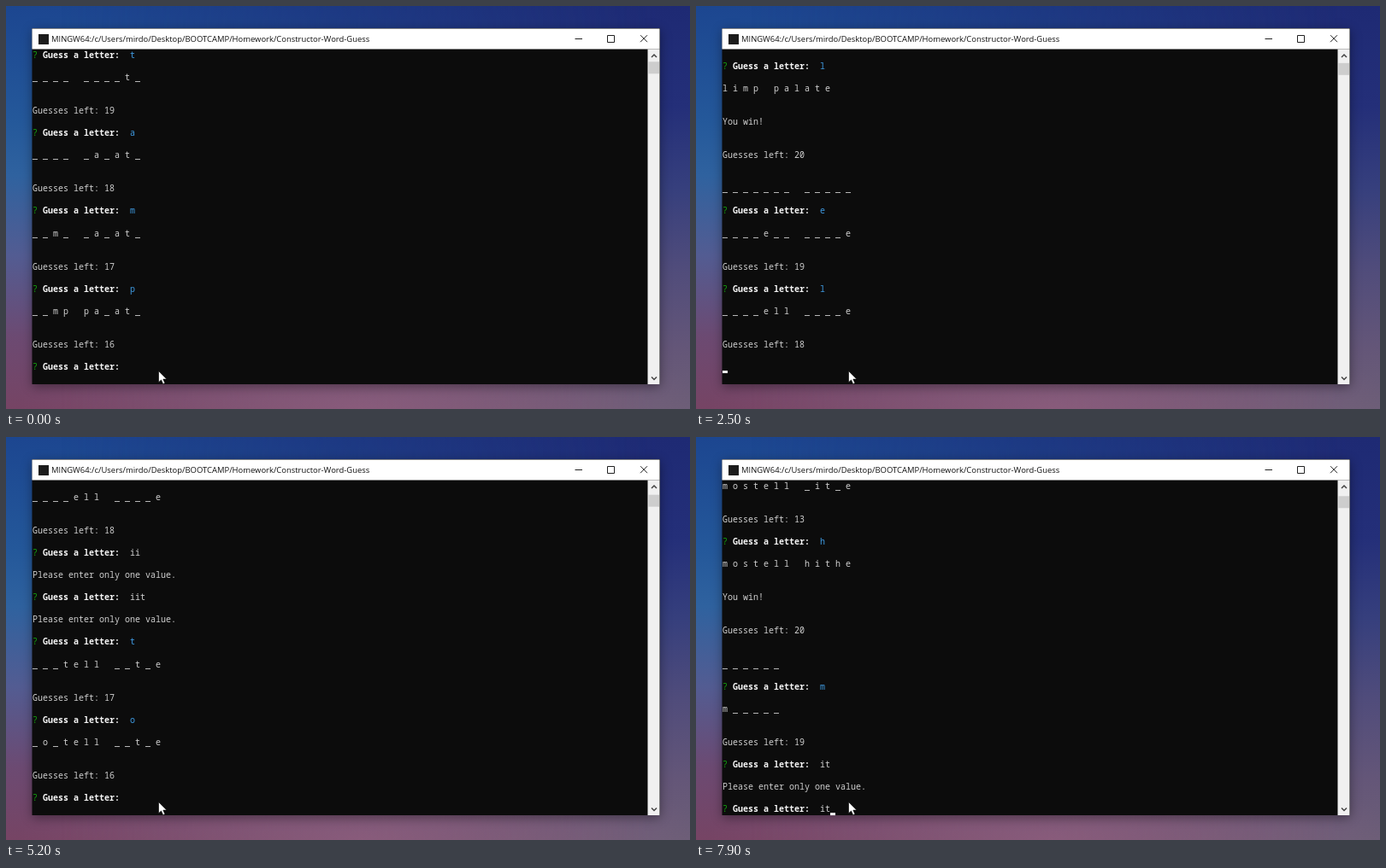
These frames come from a looping animation (800 px wide and 472 px high, 8000 ms). An HTML page:

```html
<!DOCTYPE html>
<html lang="en">
<head>
<meta charset="utf-8">
<title>Word guess terminal</title>
<style>
  html, body { margin: 0; width: 100%; height: 100%; overflow: hidden; }
  .stage {
    position: relative; width: 800px; height: 472px; overflow: hidden;
    background: linear-gradient(#1c4690, #24589a 28%, #2f629f 42%, #535c92 62%, #6c4a72 82%, #764464);
  }
  .stage > * { position: absolute; }
  .dusk {
    inset: 0;
    background: linear-gradient(#1e2a74, #242f79 25%, #363f7d 45%, #504c7b 65%, #645678 85%, #6c5e77);
    -webkit-mask-image: linear-gradient(90deg, transparent 8%, #000 95%);
    mask-image: linear-gradient(90deg, transparent 8%, #000 95%);
  }
  .glow {
    inset: 0;
    background: radial-gradient(ellipse 400px 110px at 52% 100%, rgba(156,100,134,.55), transparent);
  }
  .shadow {
    left: 31px; top: 26px; width: 734px; height: 417px;
    box-shadow: 0 3px 12px rgba(0,0,0,.4);
  }
  .title {
    left: 53px; top: 26px; line-height: 25px; white-space: pre; color: #111;
    font-family: "Open Sans", "Noto Sans", sans-serif; font-size: 9.43px;
  }
  .text {
    left: 31px; top: 50.5px; width: 719px; height: 392.5px; margin: 0; overflow: hidden;
    font-family: "Noto Sans Mono", "DejaVu Sans Mono", monospace;
    font-size: 10px; font-weight: 500; line-height: 13.07px; color: #d0d0d0;
    font-variant-ligatures: none;
  }
  .text i { font-style: normal; color: #13a10e; }
  .text b { font-weight: 600; color: #f5f5f5; }
  .text u { text-decoration: none; color: #3f9be2; }
  .cursor { left: 31px; top: 50.5px; width: 6px; height: 3px; background: #f2f2f2; }
  svg { left: 0; top: 0; }
</style>
</head>
<body>
<div class="stage">
  <div class="dusk"></div>
  <div class="glow"></div>
  <div class="shadow"></div>
  <svg width="800" height="472" fill="none">
    <path d="M30.500 26h734.500v417h-734.500z" fill="#0c0c0c"/>
    <path d="M30.500 26.500h734v24h-734z" fill="#fff"/>
    <path d="M750.500 50.500h14v392.500h-14z" fill="#f0f0f0"/>
    <path class="thumb" d="M751.500 0h12.500v14h-12.500z" fill="#cdcdcd"/>
    <path d="M38 33h12v12h-12z" fill="#1c1c1c"/>
    <path d="M665.500 38.500h8.500M703.500 34.500h8v8h-8zM742 34.200l8 8M750 34.200l-8 8" stroke="#222"/>
    <path d="M755 60l3-3 3 3M755 434.500l3 3 3-3" stroke="#444" stroke-width="1.5"/>
  </svg>
  <div class="title">MINGW64:/c/Users/mirdo/Desktop/BOOTCAMP/Homework/Constructor-Word-Guess</div>
  <pre class="text"></pre>
  <div class="cursor"></div>
  <svg width="800" height="472">
    <path d="M178.500 427.500v13.200l3-2.800 2.200 4.800 2.200-1-2.100-4.600h4.100z" fill="#fff" stroke="#000" stroke-width=".6"/>
  </svg>
</div>
<script>
const LOOP = 8000, STEP = 100, ROW = 13.07, COL = 6, ROWS = 30;
const BLINK = 1060, BLINK_START = 150, PROMPT_DELAY = 100;
const words = ['limp palate', 'mostell hithe', 'm.....'];

// Time in ms followed by a key: ! is enter, < is backspace.
const keys = ('400e 500! 800i 900! 1200l 1400! 1900e 2000! 2400l 2500! ' +
  '2800i 2900i 3200! 3700t 3800! 4000< 4100< 4200< 4300t 4500! ' +
  '4900o 5000! 5300i 5400! 5700s 5800! 6100m 6200! 6500h 6600! ' +
  '7100m 7200! 7400i 7500t 7700!')
  .split(' ').map(k => ({ at: parseInt(k, 10), key: k.slice(-1) }));

const [text, cursor, thumb] = ['.text', '.cursor', '.thumb'].map(s => document.querySelector(s));

const prompt = (input, accepted) =>
  `<i>?</i> <b>Guess a letter:</b>  ${accepted ? `<u>${input}</u>` : input}`;

function replay(time) {
  const lines = [];
  let game = 0, left = 20, seen = '', input = '', rejected = false, sentAt = -LOOP;

  const mask = () => words[game].split(' ')
    .map(w => [...w].map(c => seen.includes(c) ? c : '_').join(' ')).join('   ');

  function enter() {
    rejected = input.length > 1;
    if (rejected) {
      lines.push(prompt(input), '', 'Please enter only one value.', '');
      return;
    }
    seen += input;
    left--;
    lines.push(prompt(input, true), '', mask(), '', '');
    if (mask().includes('_')) {
      lines.push(`Guesses left: ${left}`, '');
    } else {
      game++;
      left = 20;
      seen = '';
      lines.push('You win!', '', '', `Guesses left: ${left}`, '', '', mask(), '');
    }
    input = '';
  }

  for (const c of 'tamp') { input = c; enter(); }
  for (const { at, key } of keys) {
    if (at > time) break;
    if (key === '!') { enter(); if (!rejected) sentAt = at; }
    else if (key === '<') input = input.slice(0, -1);
    else input += key;
  }

  const waiting = time < sentAt + PROMPT_DELAY;
  const row = rejected ? ROWS - 1 : ROWS - 2;
  const top = lines.length - row;
  lines.push(waiting ? '' : prompt(input));
  return { lines, top, row, col: waiting ? 0 : 19 + input.length };
}

let shown = -1;
function draw() {
  const time = Math.floor(performance.now() % LOOP / STEP) * STEP;
  if (time !== shown) {
    shown = time;
    const { lines, top, row, col } = replay(time);
    text.innerHTML = lines.slice(top, top + ROWS).join('\n');
    cursor.style.transform = `translate(${col * COL}px, ${(row + 1) * ROW - 3}px)`;
    const phase = (time - BLINK_START + BLINK) % BLINK;
    cursor.style.visibility = phase < BLINK / 2 ? 'visible' : 'hidden';
    thumb.setAttribute('transform', `translate(0 ${65.3 + top * 0.037})`);
  }
  requestAnimationFrame(draw);
}
draw();
</script>
</body>
</html>
```
